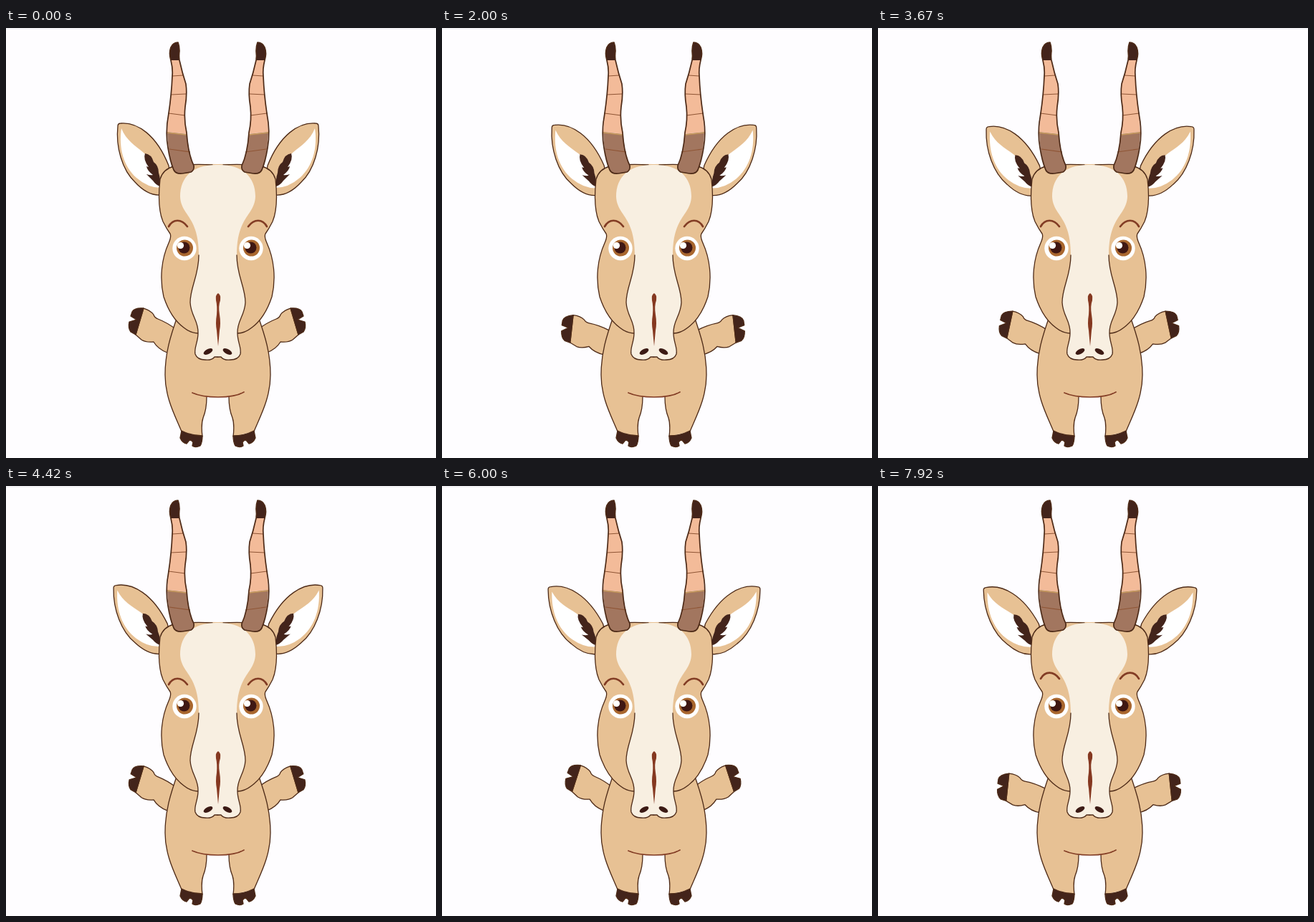
An HTML page for the animation above (8 s loop, 600 by 600 pixels).

```html
<!DOCTYPE html>
<html lang="en">
<head>
<meta charset="utf-8">
<title>Antelope</title>
<style>
  html, body { margin: 0; width: 100%; height: 100%; overflow: hidden; background: #fefdff; }
  svg { display: block; width: 100vw; height: 100vh; }
  .line { stroke: #4d2a17; stroke-width: 1.3; stroke-linejoin: round; stroke-linecap: round; }
  .thick { stroke-width: 1.7; }
  .tan { fill: #e7c194; }
  .cream { fill: #f8efe1; }
  .dark { fill: #43241b; }
  .none { fill: none; }
  .rust { stroke: #823c24; fill: none; stroke-linecap: round; }
</style>
</head>
<body>
<svg viewBox="0 0 600 600">
  <defs>
    <g id="arm">
      <path class="tan line" d="M192 391 Q202 394 206 400 Q207 404 212 406 Q225 411 238 421 V458 L225 453 Q212 448 206 438 Q195 439 189 435 L181 428Z"/>
      <path class="dark line" d="M192 391 Q179 390 176 396 L174 402 L182 407 L172 410 Q170 419 174 424 L181 428Z"/>
    </g>

    <g id="ear">
      <path class="tan line" d="M160 133 C183 131 210 149 227 192 L232 225 L216 233 C204 234 192 228 180 215 C162 198 153 166 156 137 Q156 133 160 133Z"/>
      <path fill="#fff" d="M161 140 C157 168 164 193 182 209 Q198 223 216 223 L214 206 Q207 187 192 174 C179 163 168 157 161 140Z"/>
      <path class="dark" d="M194 175 Q203 176 206 187 Q213 192 213 202 Q216 211 215 221 Q209 219 205 213 L196 204 Q202 206 205 205 Q197 199 196 193 L199 194 Q191 183 194 175Z"/>
    </g>

    <g id="horn">
      <path fill="#f3bb99" d="M230 44 Q233 57 232 67 Q231 92 227 119 L225 145 L253 148 Q248 128 250 110 Q253 92 251 78 Q246 63 242 44Z"/>
      <path fill="#a2765f" d="M225 145 Q226 177 234 198 Q237 204 246 203 L258 201 Q263 198 262 192 Q254 175 252 148Z"/>
      <path class="dark" d="M230 45 Q227 35 230 27 Q233 20 240 20 Q242 25 242 32 Q241 39 242 45Z"/>
      <path class="none" stroke="#8f5535" stroke-width="1.2" d="M232 67 L247 66 M230 93 L251 92 M227 119 L250 122 M228 169 L257 173"/>
      <path class="none" stroke="#c89a5c" stroke-width="1.5" d="M225 146 L252 149"/>
      <path class="none line thick" d="M240 20 Q233 20 230 27 Q227 35 230 45 Q233 57 232 67 Q231 92 227 119 Q222 145 226 167 Q229 186 234 198 Q237 204 246 203 L258 201 Q263 198 262 192 Q254 175 252 146 Q248 128 250 110 Q253 92 251 78 Q246 63 242 45 Q241 39 242 32 Q242 25 240 20Z"/>
    </g>

    <g id="bodyHalf">
      <path class="tan" d="M296 400 H240 C229 431 222 454 222 484 C222 516 236 541 245 563 L274 570 Q272 553 275 544 Q280 532 280 515 H296Z"/>
      <path class="none line" d="M240 400 C229 431 222 454 222 484 C222 516 236 541 245 563 M274 570 Q272 553 275 544 Q280 532 280 515"/>
      <path class="dark line" d="M245 562 Q259 569 274 569 Q274 578 271 583 Q264 586 260 583 L261 578 L257 574 L252 580 Q246 579 243 572Z"/>
    </g>

    <g id="headHalf">
      <path class="tan" d="M296 190 Q258 189 234 193 Q219 197 215 211 C212 238 214 258 219 270 Q224 280 229 287 Q231 291 227 300 C217 322 214 349 220 375 Q230 405 248 418 Q258 426 268 427 H296Z"/>
      <path class="none line" d="M288 191 Q258 189 234 193 Q219 197 215 211 C212 238 214 258 219 270 Q224 280 229 287 Q231 291 227 300 C217 322 214 349 220 375 Q230 405 248 418 Q258 426 268 426"/>
      <path class="cream" d="M296 191 C262 190 243 207 243 235 C244 262 269 262 269 317 C269 346 257 361 257 383 C258 402 269 409 268 426 C268 438 262 447 264 455 Q267 463 278 463 Q287 464 291 459 H296Z"/>
      <path class="none line" d="M269 317 C269 346 257 361 257 383 C258 402 269 409 268 426 C268 438 262 447 264 455 Q267 463 278 463 Q287 464 291 459 H296"/>
      <ellipse fill="#3c1a14" cx="282" cy="451.5" rx="7" ry="3.4" transform="rotate(-28 282 451.5)"/>
    </g>

    <path id="brow" class="rust" stroke-width="2.7" d="M227 277 C233 266 245 266 253 277"/>

    <g id="eye">
      <circle r="16.700" cy=".5" fill="#fff"/>
      <circle r="11.500" cx=".5" fill="#a9672f"/>
      <circle r="8" cx="-.5" cy="-.5" fill="#3f1713"/>
      <circle r="4.600" cx="-5.500" cy="-3.500" fill="#fff"/>
    </g>
  </defs>

  <rect width="600" height="600" fill="#fefdff"/>
  <rect width="600" height="2" fill="#f3f2f5"/>
  <g id="stage"></g>
</svg>

<script>
const LOOP = 8000;
const ARM_REST = 16.5;
const EAR_END = 6670;
const BROW_START = 6170;

// Arm tilt over time: [ms, degrees]
const ARM = [[-700, 20], [0, 16.5], [1170, 9.3], [2100, 6.2], [2920, 7.7], [4420, 16.7],
             [5420, 21.3], [6670, 12.5], [7920, 6], [8600, 5.5]];

const use = (id, attrs = '') => `<use href="#${id}" ${attrs}/>`;
const mirror = (content, width = 591) =>
  content + `<g transform="translate(${width} 0) scale(-1 1)">${content}</g>`;

const stage = document.getElementById('stage');
stage.innerHTML =
  mirror(use('arm', 'class="arm"'), 589) +
  mirror(use('bodyHalf')) +
  '<path class="rust" stroke-width="1.7" d="M260 509 Q273 515 296 515 Q320 515 332 508"/>' +
  mirror(use('ear', 'class="ear"'), 592) +
  mirror(use('headHalf')) +
  '<path fill="#853820" d="M296 370 Q300 372 299 380 Q296 388 298 400 Q300 412 298 422 L296 444 L294 422 Q292 412 294 400 Q295 388 293 380 Q292 372 296 370Z"/>' +
  mirror(use('horn')) +
  mirror(use('brow', 'class="brow"')) +
  use('eye', 'transform="translate(249 307)"') +
  use('eye', 'transform="translate(342 307)"');

const setAll = (name, transform) =>
  stage.querySelectorAll('.' + name).forEach(el => el.setAttribute('transform', transform));

const clamp01 = v => Math.min(1, Math.max(0, v));

// Cubic Hermite curve through the key poses
function sample(keys, t) {
  let i = 1;
  while (i < keys.length - 3 && t >= keys[i + 1][0]) i++;
  const [a, b, c, d] = keys.slice(i - 1, i + 3);
  const span = c[0] - b[0], u = (t - b[0]) / span;
  const m0 = (c[1] - a[1]) / (c[0] - a[0]) * span;
  const m1 = (d[1] - b[1]) / (d[0] - b[0]) * span;
  const u2 = u * u, u3 = u2 * u;
  return (2 * u3 - 3 * u2 + 1) * b[1] + (u3 - 2 * u2 + u) * m0
       + (3 * u2 - 2 * u3) * c[1] + (u3 - u2) * m1;
}

function draw(t) {
  setAll('arm', `rotate(${sample(ARM, t) - ARM_REST} 242 446)`);
  setAll('ear', `rotate(${-6.8 * clamp01(t / EAR_END)} 228 215)`);
  setAll('brow', `translate(0 ${-8.5 * clamp01((t - BROW_START) / (LOOP - BROW_START))})`);
}

const start = performance.now();
function tick() {
  draw((performance.now() - start) % LOOP);
  requestAnimationFrame(tick);
}
tick();
</script>
</body>
</html>
```
